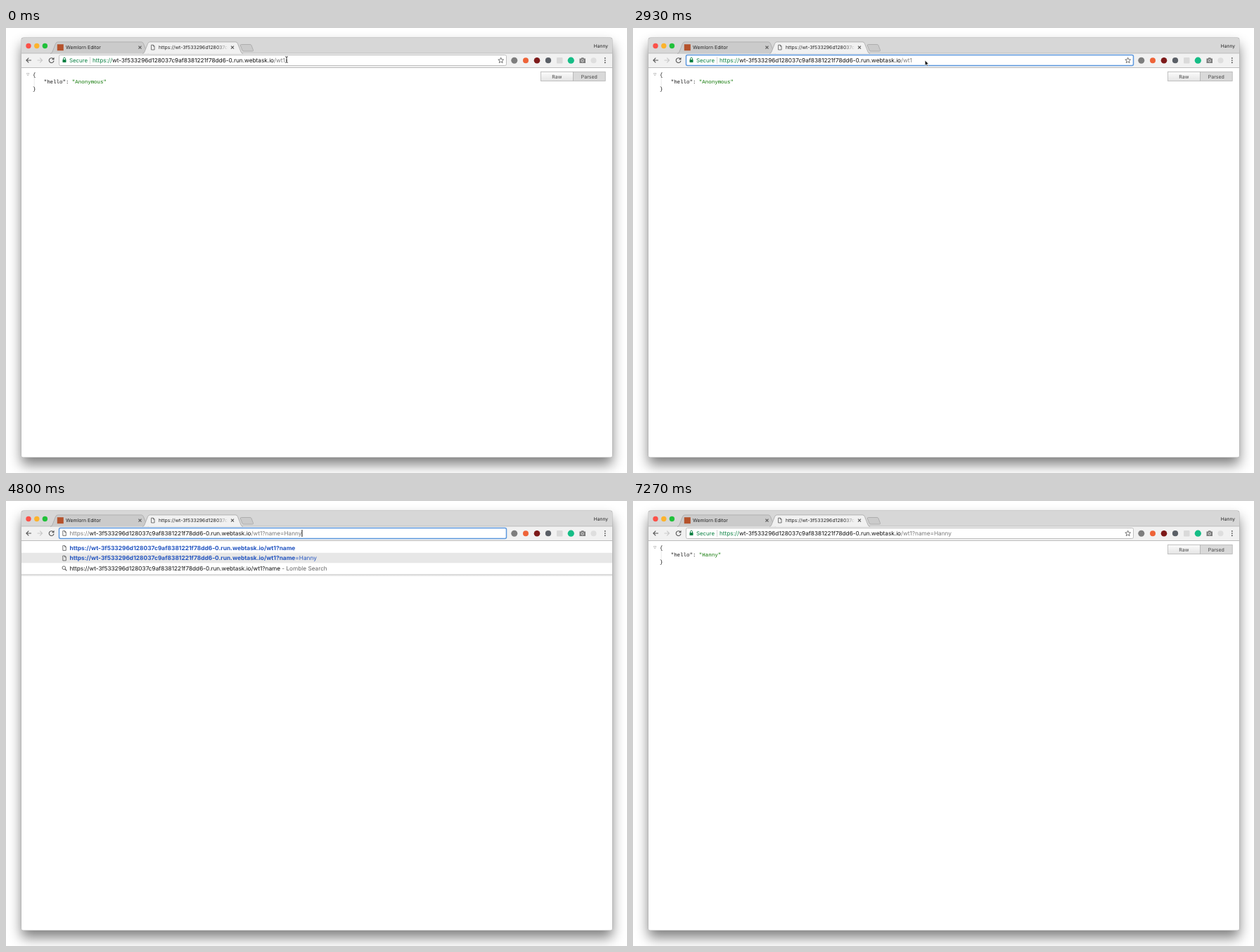
Animation, 883 px wide and 634 px high, one loop 10000 ms. Source, as an HTML page:

```html
<!DOCTYPE html>
<html lang="en">
<head>
<meta charset="utf-8">
<title>Query parameter demo</title>
<style>
  html, body { margin: 0; width: 100%; height: 100%; overflow: hidden; background: #fff; }
  svg { display: block; width: 100%; height: 100%; }
  text { font-family: Inter, Roboto, sans-serif; font-feature-settings: "calt" 0; text-rendering: geometricPrecision; }
  .url { font-size: 8.24px; }
  .tab { font-size: 6.9px; fill: #222; }
  .json text { font-family: "Liberation Mono", monospace; font-size: 7.45px; fill: #111; }
  .json .str { fill: #0b7500; }
  .btn { font-size: 7px; fill: #444; text-anchor: middle; }
  .line { fill: none; stroke: #555; stroke-width: 1.1; }
  .scheme { fill: #0b8043; }
  .typing .scheme { fill: #777; }
  .host { fill: #111; }
  .path { fill: #777; }
  .link { fill: #2254c0; }
  .link .hit { font-weight: 700; font-size: 8.38px; }
  .hint { fill: #666; }
</style>
</head>
<body>
<svg viewBox="0 0 883 634" xmlns="http://www.w3.org/2000/svg">
  <defs>
    <filter id="shadow" x="-10%" y="-10%" width="120%" height="120%">
      <feGaussianBlur stdDeviation="9"/>
    </filter>
    <linearGradient id="fade" x1="217" x2="316" y1="0" y2="0" gradientUnits="userSpaceOnUse">
      <stop offset=".84" stop-color="#222"/>
      <stop offset="1" stop-color="#222" stop-opacity="0"/>
    </linearGradient>
    <linearGradient id="drop" x2="0" y2="1">
      <stop stop-color="#bdbdbd"/>
      <stop offset="1" stop-color="#fff" stop-opacity="0"/>
    </linearGradient>
    <linearGradient id="button" x2="0" y2="1">
      <stop stop-color="#fbfbfb"/>
      <stop offset="1" stop-color="#e4e4e4"/>
    </linearGradient>
    <clipPath id="titleClip"><rect x="215" y="20" width="101" height="15"/></clipPath>
    <path id="doc" class="line" d="M-2.2-3.4H.7L2.3-1.7V3.4H-2.2ZM.6-3.4V-1.6H2.3" style="stroke-width:.8"/>
    <path id="close" class="line" d="M-2-2L2 2M2-2L-2 2"/>
  </defs>

  <!-- window -->
  <rect x="22" y="24" width="840" height="598" rx="3" fill="#000" opacity=".5" filter="url(#shadow)"/>
  <rect x="21.6" y="13.6" width="840.8" height="598.4" rx="3.4" fill="#aaa"/>
  <path d="M22 37V17a3 3 0 0 1 3-3H859a3 3 0 0 1 3 3V37Z" fill="#d7d7d7"/>
  <path d="M22 56H862V609a2.5 2.5 0 0 1-2.5 2.5H24.500a2.500 2.500 0 0 1-2.500-2.500Z" fill="#fff"/>
  <rect x="22" y="36" width="840" height="20.500" fill="#f1f1f1"/>
  <path d="M22 36H862" stroke="#b4b4b4" stroke-width=".8"/>
  <path d="M22 56.500H862" stroke="#bcbcbc"/>
  <circle cx="32" cy="25.500" r="3.700" fill="#fb5149"/>
  <circle cx="43.800" cy="25.500" r="3.700" fill="#fdb32c"/>
  <circle cx="55.400" cy="25.500" r="3.700" fill="#20c13a"/>

  <!-- tabs -->
  <g stroke="#a6a6a6" stroke-width=".8">
    <path id="backTab" fill="#cbcbcb"/>
    <path d="M334.500 23.500H347q1.500 0 2 1.300L351.500 31.500q.5 1.500-1 1.500H338q-1.500 0-2-1.300L333.300 25q-.5-1.500 1.200-1.500Z" fill="#cbcbcb"/>
    <path id="frontTab" fill="#f1f1f1"/>
  </g>
  <rect x="72.800" y="23.200" width="9" height="9" fill="#b5522b"/>
  <text class="tab" x="85" y="30">Wemlorn Editor</text>
  <use href="#close" x="190.500" y="27.600"/>
  <use href="#doc" x="208.800" y="27.600"/>
  <text class="tab" x="217" y="30" style="fill:url(#fade)" clip-path="url(#titleClip)">https://wt-3f533296d128037c9af</text>
  <use href="#close" x="322" y="27.600"/>
  <text class="tab" x="856" y="28.200" text-anchor="end" style="font-size:6.650px">Hanny</text>

  <!-- toolbar -->
  <path class="line" d="M36 46H29M32.300 42.600L28.900 46L32.300 49.400"/>
  <path class="line" d="M44.500 46H51.500M48.200 42.600L51.600 46L48.200 49.400" style="stroke:#c9c9c9"/>
  <path class="line" d="M67.200 43.900A3.400 3.400 0 1 0 68 46.700"/>
  <path d="M68.500 41.800V45.300H65Z" fill="#555"/>
  <rect id="box" x="75.500" y="38.500" width="636" height="15" rx="2" fill="#fff"/>
  <g id="secure">
    <rect x="80.500" y="45" width="5" height="3.900" rx=".5" fill="#0b8043"/>
    <path class="line" d="M81.500 45V43.800a1.500 1.500 0 0 1 3 0V45" style="stroke:#0b8043;stroke-width:.9"/>
    <text x="90" y="49" fill="#0b8043" font-size="7.800">Secure</text>
    <path d="M119.500 41V51" stroke="#ccc" stroke-width=".8"/>
  </g>
  <use id="boxDoc" href="#doc" x="83" y="46"/>
  <rect id="selection" y="39.500" height="13.500" fill="#b4d5fe"/>
  <text id="url" class="url" y="49"><tspan class="scheme"></tspan><tspan class="host"></tspan><tspan class="path"></tspan></text>
  <rect id="caret" y="41" width="1" height="10" fill="#111"/>
  <path id="star" class="line" style="stroke-width:.8"/>
  <circle cx="722.800" cy="46.200" r="4.500" fill="#7d7d7d"/>
  <circle cx="739" cy="46.200" r="4" fill="#ee6338"/>
  <circle cx="755" cy="46.200" r="4.300" fill="#7d1a1a"/>
  <circle cx="771" cy="46.200" r="4.100" fill="#5a5f66"/>
  <rect x="783" y="42" width="8.500" height="8.500" rx="1" fill="#dadada"/>
  <circle cx="803.300" cy="46.200" r="4.600" fill="#15bd86"/>
  <path d="M815.500 43.500H817.500L818.300 42.200H821.200L822 43.500H824V50H815.500Z" fill="#7c7c7c"/>
  <circle cx="819.700" cy="46.600" r="1.700" fill="#7c7c7c" stroke="#f1f1f1" stroke-width=".8"/>
  <circle cx="835.500" cy="46.200" r="4" fill="#dedede"/>
  <g fill="#555">
    <circle cx="851.800" cy="42.900" r=".95"/>
    <circle cx="851.800" cy="46.100" r=".95"/>
    <circle cx="851.800" cy="49.300" r=".95"/>
  </g>

  <!-- page -->
  <g id="page" class="json">
    <path d="M29.300 64.500H33L31.150 68Z" fill="none" stroke="#aaa" stroke-width=".6"/>
    <path d="M40.200 71V82" stroke="#bbb" stroke-width=".6" stroke-dasharray="1 1"/>
    <text x="38" y="68.500">{</text>
    <text x="53.700" y="78.500">"hello": <tspan id="value" class="str"></tspan></text>
    <text x="38" y="89.200">}</text>
    <g stroke="#b5b5b5" stroke-width=".8">
      <rect x="760.400" y="62.500" width="46.200" height="13" fill="url(#button)"/>
      <rect x="806.600" y="62.500" width="45.600" height="13" fill="#d9d9d9"/>
    </g>
  </g>
  <g id="buttons">
    <text class="btn" x="783.400" y="71.600">Raw</text>
    <text class="btn" x="829.300" y="71.600">Parsed</text>
  </g>

  <!-- suggestions -->
  <g id="list">
    <rect x="22" y="57" width="840" height="48" fill="#fff"/>
    <rect x="22" y="104.500" width="840" height="4" fill="url(#drop)"/>
    <rect id="row" x="22" width="840" height="14.500" fill="#e7e7e7"/>
    <use href="#doc" x="83" y="67"/>
    <use href="#doc" x="83" y="81.500"/>
    <circle class="line" cx="82.300" cy="95.200" r="2.300" style="stroke-width:.9"/>
    <path class="line" d="M84 97L86.400 99.300"/>
    <text class="url link" x="90.500" y="69.800"><tspan id="typed" class="hit"></tspan></text>
    <text class="url link" x="90.500" y="84.200"><tspan id="match" class="hit"></tspan><tspan id="rest"></tspan></text>
    <text class="url" x="90.500" y="98.700" fill="#111"><tspan id="query"></tspan><tspan class="hint"> - Lomble Search</tspan></text>
  </g>

  <!-- pointers -->
  <g id="beam" fill="none">
    <path d="M-1.800-4.300Q0-4.300 0-3Q0-4.300 1.800-4.300M0-3V3M-1.800 4.300Q0 4.300 0 3Q0 4.300 1.800 4.300M-1 .9H1" stroke="#222" stroke-width=".9"/>
  </g>
  <path id="arrow" transform="translate(415.200 46)" d="M0 0V7.400L1.700 5.800L2.900 8.600L4.100 8.100L2.900 5.300H5.200Z" fill="#111" stroke="#fff" stroke-width=".6"/>
</svg>
<script>
const LOOP = 10000;
const SCHEME = "https://";
const HOST = "wt-3f533296d128037c9af8381221f78dd6-0.run.webtask.io";
const FULL = "?name=Hanny";
const BASE = SCHEME + HOST + "/wt1";

const $ = id => document.getElementById(id);
const show = (id, on) => $(id).setAttribute("visibility", on ? "visible" : "hidden");
const attr = (id, values) => {
  for (const key in values) $(id).setAttribute(key, values[key]);
};
const within = (t, a, b) => t >= a && t < b;
// Latest value of a [time, value] list
const latest = (list, t) => list.reduce((v, [at, next]) => t >= at ? next : v, "");

const barKeys = [[3130, "?"], [3730, "?n"], [3870, "?na"], [3930, "?nam"], [4000, "?name"], [4800, FULL]];
const listKeys = [[3130, "?"], [3800, "?n"], [3930, "?nam"], [4070, "?name"]];

const tabPath = (a, b) =>
  `M${a} 36.4q2 0 3-2.5l4.5-11.500q1-2.500 3-2.500H${b - 10.5}q2 0 3 2.500l4.500 11.500q1 2.500 3 2.500`;

function starPath(cx, cy) {
  const points = Array.from({ length: 10 }, (_, i) => {
    const r = i % 2 ? 1.8 : 4.1, a = (i / 5 - 0.5) * Math.PI;
    return (cx + r * Math.cos(a)).toFixed(2) + " " + (cy + r * Math.sin(a)).toFixed(2);
  });
  return "M" + points.join("L") + "Z";
}

function drawBar(t) {
  const typing = within(t, 3130, 5470);
  const focus = within(t, 1070, 5200);
  const selected = within(t, 1130, 1670) || within(t, 1800, 2330);
  const blinkOff = within(t, 2930, 3130) || within(t, 4600, 4800);
  const x = typing ? 90.5 : 123;
  const url = $("url");

  attr("box", { stroke: focus ? "#5c98de" : "#b8b8b8", "stroke-width": focus ? 1.5 : 0.9 });
  show("secure", !typing);
  show("boxDoc", typing);
  show("star", !within(t, 3130, 5200));

  url.setAttribute("x", x);
  url.classList.toggle("typing", typing);
  [SCHEME, HOST, "/wt1" + latest(barKeys, t)].forEach((s, i) => { url.children[i].textContent = s; });

  const width = url.getComputedTextLength();
  attr("selection", { x, width });
  show("selection", selected);
  attr("caret", { x: x + width });
  show("caret", focus && t >= 1670 && !selected && !blinkOff);
}

function drawList(t) {
  const open = within(t, 3130, 5200);
  const text = latest(listKeys, t);
  show("list", open);
  attr("row", { y: t < 4800 ? 59.3 : 73.8 });
  $("typed").textContent = $("match").textContent = $("query").textContent = BASE + text;
  $("rest").textContent = FULL.slice(text.length);
}

function drawPage(t) {
  const on = !within(t, 3130, 5200) && !within(t, 5470, 5600);
  show("page", on);
  show("buttons", on);
  $("value").textContent = t < 5600 ? '"Anonymous"' : '"Hanny"';
}

function drawPointer(t) {
  const p = Math.min(6, Math.floor((t + 4) * 0.015)) / 6;
  const x = 399 + 16 * (1 - (1 - p) ** 2);
  const y = t < 600 ? 45 : t < 670 ? 45.5 : 46;
  attr("beam", { transform: `translate(${x} ${y})` });
  show("beam", t < 1070);
  show("arrow", within(t, 1070, 3130));
}

function draw(t) {
  drawBar(t);
  drawList(t);
  drawPage(t);
  drawPointer(t);
}

attr("backTab", { d: tabPath(63, 203) });
attr("frontTab", { d: tabPath(194, 337) });
attr("star", { d: starPath(703.7, 46.3) });

const start = performance.now();
function tick() {
  draw((performance.now() - start) % LOOP);
  requestAnimationFrame(tick);
}
tick();
</script>
</body>
</html>
```
